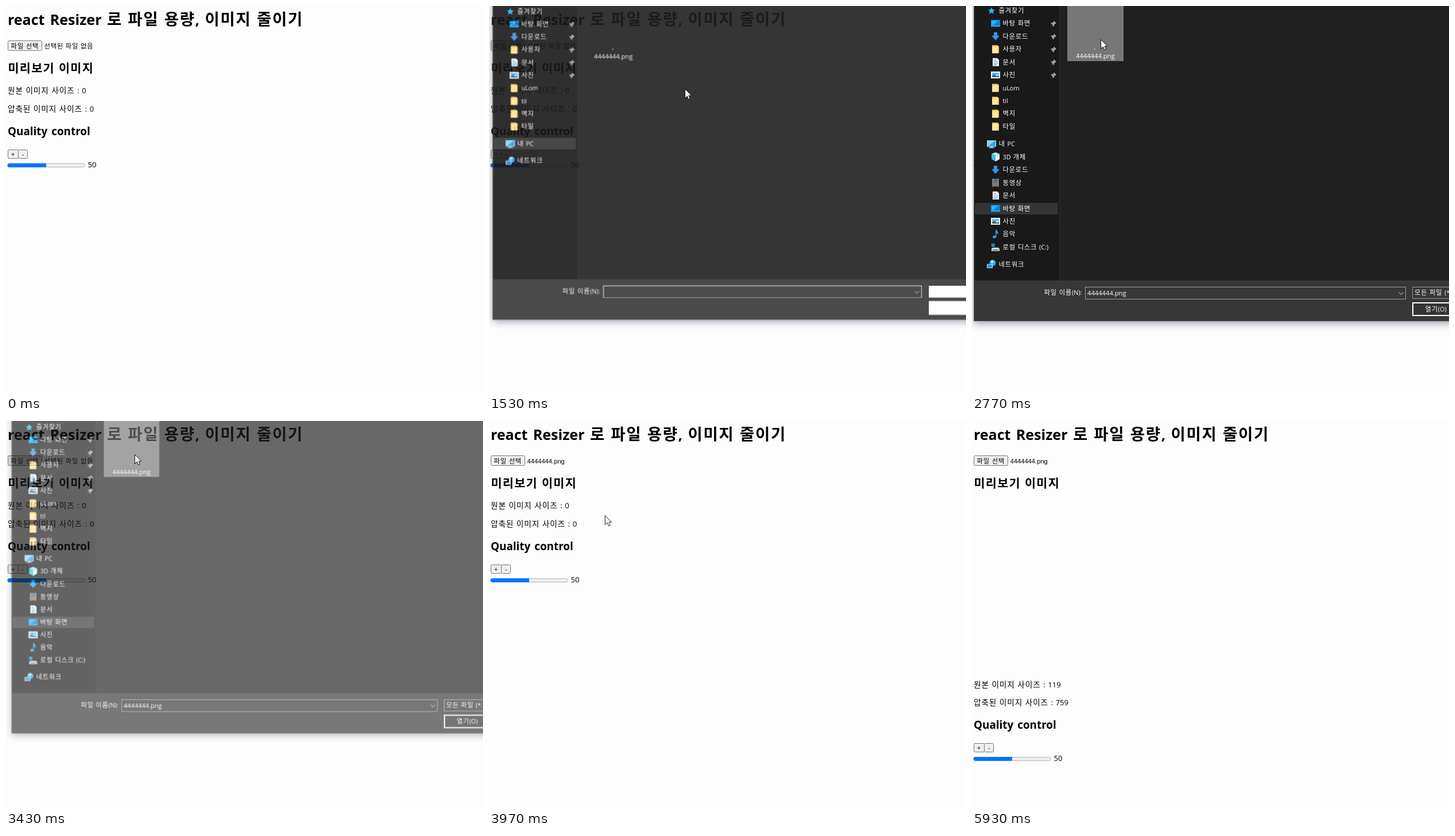
An HTML page for the animation above (6.83 s loop, 831 by 674 pixels).

```html
<!DOCTYPE html>
<html lang="ko">
<head>
<meta charset="utf-8">
<title>react Resizer</title>
<style>
html, body { margin: 0; width: 100%; height: 100%; overflow: hidden; background: #fdfdfd; }
svg { display: block; width: 831px; height: 674px; }
text { font-family: "Open Sans", "Noto Sans", sans-serif; word-spacing: .09em; white-space: pre; }
.ko { font-family: "Noto Sans CJK KR", "Noto Sans CJK", sans-serif; font-size: 1.04em; letter-spacing: .066em; }
.bold { font-weight: 700; word-spacing: .117em; }
.bold .ko { font-size: 1.1em; letter-spacing: .062em; }
.small { font-family: "Liberation Sans", Arial, sans-serif; }
.light { fill: #fff; }
.btn { fill: #efefef; stroke: #767676; }
#dialog { transform-origin: 476px 190px; }
#shadow { filter: drop-shadow(0 4px 7px rgba(30, 25, 70, .4)); }
</style>
</head>
<body>
<svg id="stage" viewBox="0 0 831 674">
  <defs>
    <!-- 16 x 16 icons, centred on 0,0 -->
    <path id="star" fill="#2fb0f5" d="M0-6 1.8-2 6-1.6 2.9 1.3 3.9 5.8 0 3.5-4 6-3 1.5-6-1.2-1.8-1.8Z"/>
    <g id="desktop"><path fill="#0a84d8" d="M-8-6H8V6H-8Z"/><path fill="#27b4fa" d="M-7-5H5L-4 3H-7Z"/><path stroke="#bdeaff" stroke-dasharray="1.5 1.5" d="M-7 4.5H7"/></g>
    <path id="down" fill="#2f95ee" d="M-3-7H3V-1H7L0 7-7-1H-3Z"/>
    <g id="folder"><path fill="#f0c65c" d="M-6-7H3L6-5V7H-6Z"/><path fill="#ffe69b" d="M-6-4 4-5V7H-6Z"/></g>
    <g id="doc"><path fill="#f4f8fb" d="M-5-7H3L6-4V7H-5Z"/><path stroke="#3f8fce" d="M-3-3.5H1M-3-.5H4M-3 2.5H4M-3 5H2"/></g>
    <g id="photo"><path fill="#f4f8fb" d="M-8-6H8V6H-8Z"/><path fill="#62b4e8" d="M-6-4H6V0H-6Z"/><path fill="#36658a" d="M-6 4V1L-2-1 2 2 6 1V4Z"/></g>
    <g id="pc"><path fill="#c5dbe8" d="M-8-6H8V5H-8Z"/><path fill="#2ba7e8" d="M-7-5H7V4H-7Z"/><path fill="#7fd5fa" d="M-7-5H5L-5 4H-7Z"/><path fill="#a9c6d7" d="M-2 5H2V6H5V7.5H-5V6H-2Z"/></g>
    <g id="cube"><path fill="#a8eefa" d="M0-8 7-5 0-2-7-5Z"/><path fill="#39c4e0" d="M-7-5 0-2V8L-7 4Z"/><path fill="#e4fbff" d="M7-5 0-2V8L7 4Z"/></g>
    <g id="film"><path fill="#59616b" d="M-6-7H6V7H-6Z"/><path fill="#3c78b4" d="M-3-6H3V-1H-3Z"/><path fill="#a6743d" d="M-3 0H3V6H-3Z"/><path stroke="#e6e6e6" stroke-dasharray="1.5 1.5" d="M-4.5-6V7M4.5-6V7"/></g>
    <path id="note" fill="#2f9ff0" d="M0-8H1.5C2-5 6-4 4.5 1 4-1 3-2 1.5-2V4C1.5 8-5 8-5 5-5 2-2 2 0 3Z"/>
    <g id="disk"><path fill="#d4dadd" d="M-5 1H5L7 3V7H-7V3Z"/><path fill="#59656b" d="M-5 4H5V5.5H-5Z"/><path fill="#27aef5" d="M-7-6H-4.5V-3.5H-7ZM-4-6H-1.5V-3.5H-4ZM-7-3H-4.5V-.5H-7ZM-4-3H-1.5V-.5H-4Z"/></g>
    <g id="net"><circle cx="2" cy="-2" r="5.5" fill="#3aa0e8"/><path fill="#9fdcfa" d="M0-7 5-5 2-1-2-3Z"/><path fill="#d4e6f0" d="M-8 0H2V7H-8Z"/><path fill="#2691d6" d="M-7 1H1V6H-7Z"/></g>
    <path id="pin" fill="#a0a0a0" d="M1-5 5-1 4 0 3 0 1 2V4L0 5-2 2-5 5-2 1-5-1-4-2H-2L0-3V-4Z"/>
  </defs>
</svg>
<script>
const LOOP = 6830;
const BODY = 13.1, HEAD = 18.85, UI = 10.9;
const stage = document.getElementById('stage');
const $ = id => document.getElementById(id);

// Hangul runs get their own face and size
const label = (x, y, text, size, cls = '', id = '') =>
  `<text x="${x}" y="${y}" font-size="${size}" class="${cls}"${id && ` id="${id}"`}>${
    text.replace(/[가-힣]+/g, run => `<tspan class="ko">${run}</tspan>`)}</text>`;
const icon = (name, x, y) => `<use href="#${name}" x="${x}" y="${y}"/>`;
const box = (x, y, w, h, attrs = '') => `<rect x="${x}" y="${y}" width="${w}" height="${h}" ${attrs}/>`;
const row = (name, text, y, indent = 7) =>
  icon(name, 34 + indent, y) + label(46.5 + indent, y + 4, text, UI, 'light');

const PITCH = 22.45;
const quick = [['desktop', '바탕 화면'], ['down', '다운로드'], ['folder', '사용자'], ['doc', '문서'],
  ['photo', '사진'], ['folder', 'uLom'], ['folder', 'til'], ['folder', '벽지'], ['folder', '타일']];
const drives = [['cube', '3D 개체'], ['down', '다운로드'], ['film', '동영상'], ['doc', '문서'],
  ['desktop', '바탕 화면'], ['photo', '사진'], ['note', '음악'], ['disk', '로컬 디스크 (C:)']];
const rows = (list, top) => list.map(([name, text], i) => row(name, text, top + i * PITCH)).join('');

const page = `
  ${label(3, 33, 'react Resizer 로 파일 용량, 이미지 줄이기', 25, 'bold')}
  ${box(3.5, 60.5, 59, 17, 'rx="2" class="btn" id="choose"')}
  ${label(8.5, 73.5, '파일 선택', UI)}
  ${label(66.5, 73.5, '선택된 파일 없음', UI, '', 'noFile')}
  ${label(66.5, 74, '4444444.png', 11.2, 'small', 'picked')}
  ${label(3.5, 115.5, '미리보기 이미지', HEAD, 'bold')}
  <g id="lower">
    <g id="sizesOld">${label(3, 152, '원본 이미지 사이즈 : 0', BODY)}${label(3, 184, '압축된 이미지 사이즈 : 0', BODY)}</g>
    <g id="sizesNew">${label(3, 153, '원본 이미지 사이즈 : 119', BODY)}${label(3, 184, '압축된 이미지 사이즈 : 759', BODY)}</g>
    ${label(3, 225, 'Quality control', HEAD, 'bold')}
    ${box(3.5, 250.5, 18, 15, 'rx="2" class="btn"')}${label(9, 262, '+', 10.5, 'small')}
    ${box(21.5, 250.5, 16, 15, 'rx="2" class="btn"')}${label(28, 262, '-', 10.5, 'small')}
    ${box(3.5, 274.5, 134, 6, 'rx="3" fill="#efefef" stroke="#b2b2b2"')}
    <path fill="#0075ff" d="M70 274H6A3 3 0 0 0 6 281H70Z"/>
    ${label(142.5, 281, '50', BODY)}
  </g>`;

const dialog = `<g id="dialog">
  ${box(3, -30, 897, 579, 'fill="#202020" id="shadow"')}
  ${box(3, -30, 149, 508, 'fill="#191919"')}
  <path stroke="#303030" d="M152.5-30V478"/>
  ${box(3, 478, 897, 71, 'fill="#373737"')}
  <path fill="none" stroke="#555" d="M3.5-30V548.5H900"/>
  ${box(5, 230, 144, 20, 'fill="#353535" id="rootMark"')}
  ${row('star', '즐겨찾기', 8, 0)}
  ${rows(quick, 30.3)}
  ${[0, 1, 2, 3, 4].map(i => icon('pin', 142, 31 + i * PITCH)).join('')}
  ${row('pc', '내 PC', 240, 0)}
  <g id="tree">
    ${box(5, 343, 144, 20, 'fill="#353535"')}
    ${rows(drives, 262.7)}
  </g>
  <g id="network">${row('net', '네트워크', 449.5, 0)}</g>
  ${box(166, -10, 98, 106, 'fill="#4d4d4d" id="hover"')}
  ${box(166, -10, 98, 106, 'fill="#777" id="selected"')}
  ${box(213, 74, 1.5, 1.5, 'fill="#ddd"')}
  ${label(181, 91, '4444444.png', 11.2, 'light')}
  ${label(125.5, 503, '파일 이름(N):', UI, 'light')}
  ${box(197.5, 489.5, 558, 21, 'fill="#383838" stroke="#fff" id="field"')}
  <path fill="none" stroke="#ddd" d="M743.5 498.5 747.5 502.5 751.5 498.5"/>
  ${label(201, 504, '4444444.png', 11.2, 'light', 'typed')}
  <g id="controls">
    ${box(767.5, 489.5, 120, 20, 'fill="#383838" stroke="#9a9a9a"')}
    ${label(771, 503, '모든 파일 (*.*)', UI, 'light')}
    ${box(768, 517, 90, 22, 'fill="#333" stroke="#fff" stroke-width="2"')}
    ${label(789.5, 531.5, '열기(O)', UI, 'light')}
  </g>
  <g id="blanks" fill="#fff">${box(768, 489, 120, 21)}${box(768, 516, 90, 24)}</g>
</g>`;

const pointer = `<g id="cursor">
  <path id="arrow" fill="#fff" stroke="#111" d="M.5.5V16.5L4.3 13 6.7 18.5 9.3 17.3 7 12H11.8Z"/>
  <g id="beam" fill="none"><path stroke="#fff" stroke-width="3" d="M0-7V7"/>
    <path stroke="#111" d="M-4-8H-1.5L0-7 1.5-8H4M-4 8H-1.5L0 7 1.5 8H4M0-7V7"/></g>
</g>`;

stage.insertAdjacentHTML('beforeend', page + dialog + pointer);

// frames: [time in ms, properties, easing until the next one]
function play(id, frames) {
  const keys = frames.map(([t, props, easing = 'linear']) => ({ offset: t / LOOP, easing, ...props }));
  if (keys[0].offset > 0) keys.unshift({ ...keys[0], offset: 0, easing: 'step-end' });
  keys.push({ ...keys[keys.length - 1], offset: 1 });
  $(id).animate(keys, { duration: LOOP, iterations: Infinity });
}
const jump = (id, prop, steps) =>
  play(id, steps.map(([t, value]) => [t, { [prop]: value }, 'step-end']));
const show = (id, from, to = LOOP) => jump(id, 'opacity', [[0, 0], [from, 1], [to, 0]].filter(s => s[0] < LOOP));
const hide = (id, from) => jump(id, 'opacity', [[0, 1], [from, 0]]);

const EXPAND = 1640, PICK = 2500, NAMED = 3740, LOADED = 4000;

const pose = (opacity, scale) => ({ opacity, transform: `scale(${scale})` });
play('dialog', [
  [0, pose(0, .9), 'step-end'],
  [1370, pose(0, .9)],
  [1450, pose(.45, .972)],
  [1530, pose(.9, .993)],
  [1560, pose(1, .996)],
  [EXPAND, pose(1, 1), 'step-end'],
  [3400, pose(.81, .992)],
  [3430, pose(.68, .986)],
  [3570, pose(.06, .958)],
  [3590, pose(0, .954), 'step-end']
]);

hide('rootMark', EXPAND);
hide('blanks', EXPAND);
show('tree', EXPAND);
show('controls', EXPAND);
jump('network', 'transform', [[0, 'translate(0px, -179.5px)'], [EXPAND, 'none']]);
show('hover', 2130, PICK);
show('selected', PICK);
show('typed', PICK);
jump('field', 'stroke', [[0, '#fff'], [PICK, '#9a9a9a']]);

jump('choose', 'fill', [[0, '#efefef'], [600, '#e0e0e0'], [NAMED, '#efefef']]);
hide('noFile', NAMED);
show('picked', NAMED);
hide('sizesOld', LOADED);
show('sizesNew', LOADED);
jump('lower', 'transform', [[0, 'none'], [LOADED, 'translate(0px, 311px)']]);

const at = (x, y) => ({ transform: `translate(${x}px, ${y}px)` });
play('cursor', [
  [30, at(220, -22), 'ease-out'],
  [700, at(36, 66)],
  [1080, at(34, 66), 'ease-in-out'],
  [1530, at(341, 144)],
  [1640, at(341, 144), 'ease-in-out'],
  [2070, at(250, 95), 'ease-out'],
  [2450, at(224, 58), 'step-end'],
  [3600, at(224, 58), 'ease-in-out'],
  [4640, at(140, 458)],
  [4800, at(140, 458), 'ease-in-out'],
  [5270, at(190, 492), 'step-end'],
  [5700, at(190, 492), 'ease-in'],
  [5925, at(-14, 449), 'step-end']
]);
show('beam', 4590, 5080);
jump('arrow', 'opacity', [[0, 1], [4590, 0], [5080, 1]]);
</script>
</body>
</html>
```
